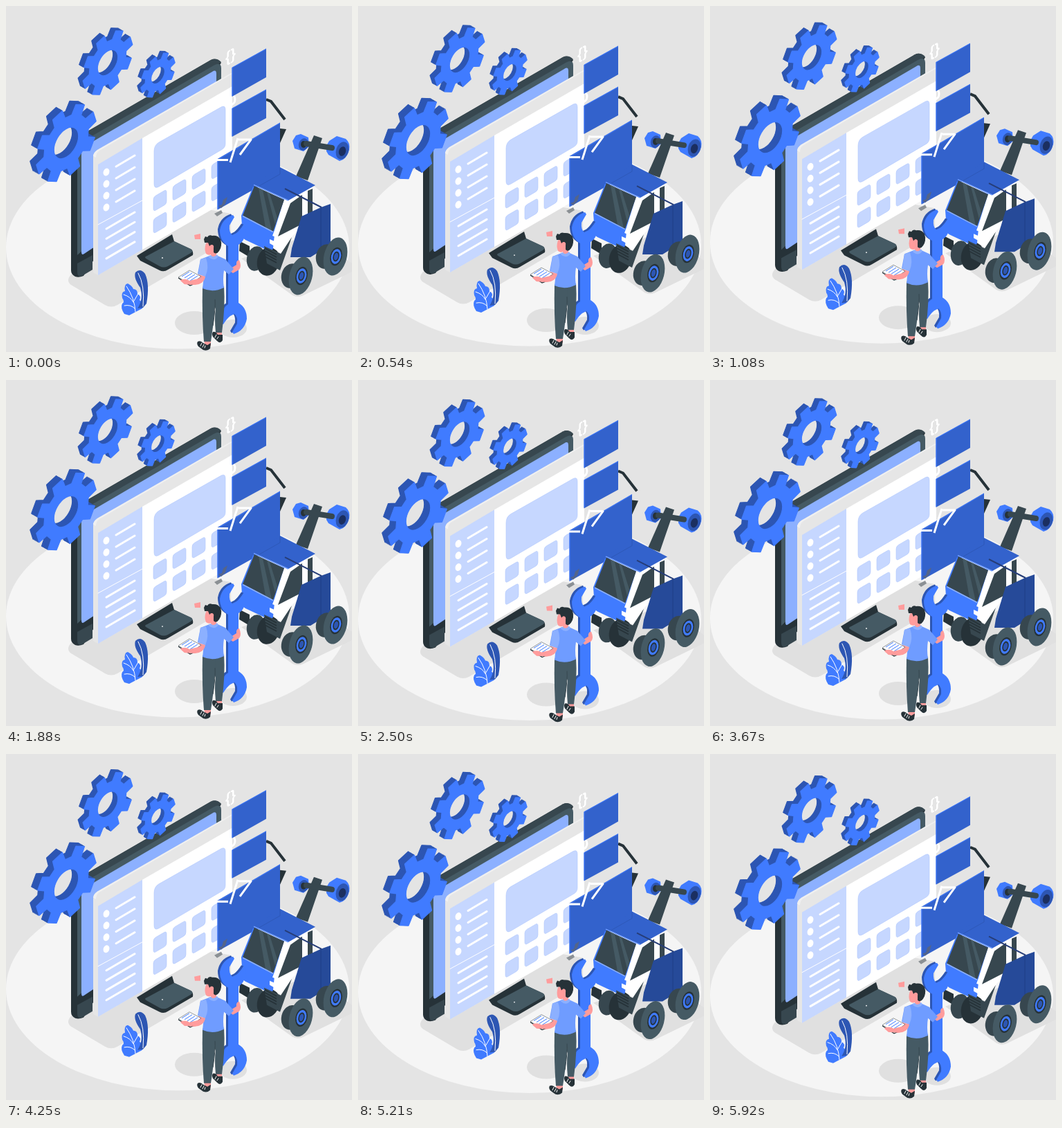
These frames come from a looping animation (500x500 px, 5.96 s). An HTML page:

```html
<!DOCTYPE html>
<html lang="en">
<head>
<meta charset="utf-8">
<title>Website maintenance</title>
<style>
html, body { margin: 0; width: 100%; height: 100%; overflow: hidden; background: #e4e4e4; }
svg { display: block; width: 100%; height: 100%; }
.blue { fill: #407bff; }
.mid { fill: #3362cc; }
.deep { fill: #2d56b3; }
.navy { fill: #264a99; }
.sky { fill: #8cb0ff; }
.pale { fill: #c6d7ff; }
.ink { fill: #263238; }
.slate { fill: #37474f; }
.steel { fill: #455a64; }
.white { fill: #fff; }
.skin { fill: #ff9c9c; }
.shade { fill: #e0e0e0; }
.line { fill: none; stroke: #fff; stroke-linecap: round; stroke-linejoin: round; }
</style>
</head>
<body>
<svg viewBox="0 0 500 500">
<g id="scene">
  <!-- ground and shadows -->
  <ellipse cx="248" cy="349" rx="248" ry="146.5" fill="#f5f5f5"/>
  <g class="shade">
    <path d="M94 388Q86 397 94 403L143 432Q152 437 161 432L325 336V300L270 290Z"/>
    <path d="M340 365L414 418Q422 422 430 418L500 384V372L440 330Z"/>
    <ellipse cx="272" cy="458" rx="28" ry="17"/>
    <ellipse cx="328" cy="466" rx="20" ry="13"/>
  </g>

  <!-- monitor -->
  <path class="ink" d="M94 232Q95 205 118 181L296 78Q304 74 311 82L112 390Q105 393 100 391Q94 388 94 382Z"/>
  <path class="slate" d="M118 181L296 78Q304 74 311 81L304 86L112 200Z"/>
  <path class="steel" d="M103 214Q103 202 112 195L300 86Q311 80 311 90V120L125 340L103 360Z"/>
  <path class="slate" d="M103 372L125 360V381L110 390Q103 393 103 384Z"/>
  <path class="sky" d="M109 214Q109 206 115 202L298 95Q304 91 304 98V240L125 350L113 358Q109 361 109 355Z"/>
  <path class="ink" d="M189 361L240 330L243 340L268 352Q271 355 270 360L234 381Q228 385 222 382L194 368Z"/>
  <path class="steel" d="M204 361L243 340L267 351Q272 354 267 357L234 376Q228 379 222 376L204 366Q198 363 204 361Z"/>
  <circle class="white" cx="226" cy="364" r=".9"/>

  <!-- browser window -->
  <path fill="#e6e6e6" d="M126 219Q126 212 132 208L327 96V277L133 389L126 385Z"/>
  <path fill="#f0f0f0" d="M126 217Q126 212 132 208L327 96V98L135 209Q130 212 130 219Z"/>
  <path class="white" d="M197 191L327 116V277L197 352Z"/>
  <path class="pale" d="M133 229L197 191V352L133 389Z"/>
  <path class="line" stroke-width="1" d="M133 316L197 281"/>
  <g id="menu"></g>
  <path class="pale" stroke="#afc6fb" stroke-width=".6" d="M214 210Q214 201 221 197L311 146Q317 143 317 150V199Q317 205 311 208L221 261Q214 265 214 257Z"/>
  <g id="tiles" class="pale" stroke="#afc6fb" stroke-width=".6"></g>

  <!-- floating panels -->
  <path d="M376 135L383 138L403 164" fill="none" stroke="#263238" stroke-width="4"/>
  <path class="ink" d="M396 177L405 178L396 198Z"/>
  <ellipse class="line" cx="324" cy="135" rx="7" ry="8" stroke-width="3"/>
  <path class="mid" d="M326.5 89L376 61.5V103L326.5 131ZM326.5 148L376 120.5V162L326.5 189ZM305.5 221L396 168.5V244L305.5 294.5Z"/>
  <path d="M327 130V89L376 62M327 188V148L376 121M306 293.5V222L396 169" fill="none" stroke="#407bff"/>
  <text class="white" transform="matrix(.87 -.5 0 1 317 83)" font-family="Arial,'Liberation Sans',sans-serif" font-weight="700" font-size="22">{}</text>
  <path class="line" stroke-width="3" style="stroke-linecap:butt" d="M305 222.5H321M324 226L335 191M336 193H354L338 215"/>
  <path fill="#8b9094" d="M301 300L311 295L313 299L305 304Z"/>
  <path fill="#54658a" d="M314 280L320 276L317 286L311 292L307 289L312 287Z"/>

  <!-- vehicle -->
  <path class="slate" d="M419 246L445 187L457 191L436 252Z"/>
  <path class="blue" d="M414 195L419 187L426 185L437 190L438 203L430 210L417 206Z"/>
  <ellipse class="deep" cx="430" cy="200" rx="7" ry="9" transform="rotate(18 430 200)"/>
  <ellipse class="ink" cx="430" cy="200" rx="4" ry="5"/>
  <path class="blue" d="M463 202L467 195L478 188L491 192Q498 198 496 208Q492 222 482 224L466 215L463 210Z"/>
  <path d="M434 199L471 205" stroke="#37474f" stroke-width="8" stroke-linecap="round"/>
  <ellipse class="deep" cx="486" cy="209" rx="9" ry="13" transform="rotate(18 486 209)"/>
  <ellipse cx="486" cy="210" rx="5" ry="7" fill="#1b2f60" transform="rotate(18 486 210)"/>

  <path class="ink" d="M338 340L352 347L352 363L337 354Z"/>
  <ellipse class="slate" cx="361" cy="365" rx="13" ry="18" transform="rotate(12 361 365)"/>
  <ellipse class="ink" cx="379" cy="369" rx="16" ry="21" transform="rotate(14 379 369)"/>
  <path class="white" d="M406 278L442 260V308L414 332L398 358L386 350L388 328Z"/>
  <path class="slate" d="M411 285L428 273V315L393 333ZM436 267L443 264V315L436 312Z"/>
  <path class="blue" d="M357 261L406 281L388 330L386 350Q385 355 380 354L346 338Q342 336 342 331L340 303Z"/>
  <path class="white" d="M402 279L409 279L390 334L385 332L388 324Z"/>
  <path class="slate" d="M359 260L402 280L386 326L342 303Z"/>
  <path class="steel" d="M365 263L371 266L384 325L375 320ZM377 269L381 271L392 306L389 316Z"/>
  <path d="M342 303.5L386 326.5" stroke="#8cb0ff" stroke-width="1.5"/>
  <path class="mid" d="M358 258L396 233L447 259L408 281Z"/>
  <path d="M358 258.5L408 281" stroke="#6f9cff" stroke-width="1.5"/>
  <path d="M396 234V243L366 260" fill="none" stroke="#2d56b3" stroke-width=".8"/>
  <path class="white" d="M381 337L388 340V347L381 343Z"/>
  <path class="slate" d="M373 347L397 358L413 334L396 382L377 372Z"/>
  <path d="M374 350l17 9m-17-5l17 9m-17-5l17 9m-17-5l17 9" stroke="#263238" stroke-width="1.6"/>
  <path class="navy" d="M427 304L455 291L469 286V345L440 363L411 363L413 350Z"/>
  <path d="M455 291V352" stroke="#1d3a80" stroke-width=".8"/>
  <path d="M403 264L456 291" stroke="#263d78" stroke-width="2"/>
  <g id="wheels"></g>

  <!-- plant -->
  <path class="blue" d="M171 445Q165 436 168 430Q172 428 168 422Q166 413 172 412Q170 402 176 401Q182 404 184 409Q190 409 190 416Q196 419 193 425Q199 428 197 437L178 447Z"/>
  <path class="deep" d="M190 437Q199 424 194 407Q184 393 187 385Q194 378 201 387Q208 402 203 430L198 436Z"/>
  <path class="line" stroke-width="1" d="M174 405Q186 422 187 442M170 417Q180 420 184 428M171 433Q180 431 186 437M192 414L185 426M191 386Q201 404 198 434"/>

  <!-- wrench -->
  <g id="wrench"></g>

  <!-- person -->
  <path class="skin" d="M272 331L281 329V337L273 337Z"/>
  <path class="skin" d="M286 480H296V491L287 489ZM303 468H312V478L304 478Z"/>
  <path class="ink" d="M277 485Q281 483 285 487L291 490L296 487L295 495Q291 499 285 497L278 492Q275 488 277 485ZM299 471Q303 470 306 475L313 475V483Q310 489 305 484L299 478Q297 474 299 471Z"/>
  <path class="line" stroke-width="1" d="M281 491l2-4m1 6l2-4m1 5l1-3M302 479l2-4m1 6l2-3"/>
  <path class="steel" d="M298 408L315 405Q317 435 312 472H303Q301 450 303 438L298 425Z"/>
  <path class="steel" d="M284 406L303 409Q303 440 296 485H286Q283 450 284 406Z"/>
  <path d="M302 424Q303 436 299 462" fill="none" stroke="#37474f"/>
  <path class="skin" d="M322 382L328 386L337 381Q341 376 337 367Q332 368 333 374L325 379Z"/>
  <path fill="#6f9cff" d="M281 366L294 361H306L317 366L329 380L322 388L315 382Q313 395 315 407Q299 415 284 408L286 390L277 387Z"/>
  <path fill="#8cb0ff" d="M281 366L289 364Q294 378 288 391L278 388Z"/>
  <path class="skin" d="M278 388L288 391Q286 402 273 403L258 402L252 397L258 395L272 396Z"/>
  <path class="skin" d="M289 343Q286 351 289 358Q293 361 296 359V363Q301 366 304 361V345L296 338Z"/>
  <path class="sky" d="M293 361L296 360Q300 365 305 359L307 362Q301 370 293 363Z"/>
  <path class="ink" d="M287 342L286 337L288 333L291 334Q293 330 298 332Q306 331 310 337Q313 347 308 354Q304 360 300 356V350Q301 345 297 345L294 347L292 342Z"/>
  <ellipse class="skin" cx="297" cy="349" rx="2.5" ry="4"/>
  <path class="white" stroke="#263238" stroke-width=".5" d="M249 392L265 382L282 391L266 402Z"/>
  <path d="M249 393L266 404L271 402" fill="none" stroke="#263238" stroke-width="1.2"/>
  <path d="M254 391l11-7m-7 9l11-7m-7 9l11-7m-7 9l11-7" stroke="#407bff" stroke-width="1"/>
  <path class="skin" d="M252 396Q260 393 265 397L282 393L284 399L272 403L258 402Z"/>

  <g id="gears"></g>
</g>
</svg>
<script>
const el = id => document.getElementById(id);
const range = n => [...Array(n).keys()];

// Sidebar entries
el('menu').innerHTML = range(4).map(i => `
  <ellipse class="white" cx="145" cy="${240 + 17 * i}" rx="4.3" ry="5.6" transform="rotate(20 145 ${240 + 17 * i})"/>
  <path class="line" stroke-width="3" d="M159 ${232 + 17 * i}l27-16M145 ${322 + 14.3 * i}l41-24"/>`).join('');

// Tiles of the content grid; the last column runs behind the large panel
const tile = 'M-9.5-1Q-9.5-5-6-7L6-14Q9.5-16 9.5-12V1Q9.5 5 6 7L-6 14Q-9.5 16-9.5 12Z';
el('tiles').innerHTML = range(8).filter(i => i % 4 < 3).map(i => {
  const col = i % 4, row = i >> 2;
  return `<path d="${tile}" transform="translate(${222.5 + 28 * col} ${281 - 15.4 * col + 32 * row})"/>`;
}).join('') + range(2).map(row =>
  `<path d="${tile}" transform="translate(306.5 ${234.8 + 32 * row})"/>`).join('');

// Wheels: tyre depth, face and hub
const oval = (x, y, rx, ry, cls) =>
  `<ellipse class="${cls}" cx="${x}" cy="${y}" rx="${rx}" ry="${ry}" transform="rotate(14 ${x} ${y})"/>`;
const wheel = (x, y) => oval(x - 14, y, 14, 18, 'slate') + oval(x, y, 16.5, 28, 'steel') +
  oval(x + 1, y, 8.5, 13.5, 'ink') + oval(x + 1, y, 7, 11, 'blue') + oval(x + 1, y, 4.5, 7.5, 'ink') +
  oval(x + 1, y, 3, 5.5, 'deep');
el('wheels').innerHTML = wheel(476, 362) + wheel(426, 390);

// Wrench: one end turned by half a circle gives the other; dark edge under a bright face
const end = `M321 389V347Q309 340 309 324Q312 307 328 302L330 305L323 317Q322 327 327 331
  L333 328Q338 324 343 316L346 317Q348 338 336 345V389Z`;
const wrench = (cls, dx, dy) => `<g class="${cls}" transform="translate(${dx} ${dy})">
  <path d="${end}"/><path d="${end}" transform="rotate(180 328.5 388)"/></g>`;
el('wrench').innerHTML = wrench('deep', -3, -1.5) + wrench('blue', 0, 0);

// Gears: extruded from the back to the front face in the isometric plane
function gear(x, y, r, hole, depth) {
  const pts = range(8).flatMap(i =>
    [[-14, .74], [-9.5, 1], [9.5, 1], [14, .74]].map(([a, k]) => {
      const t = (28 + 45 * i + a) * Math.PI / 180;
      return `${(k * r * Math.cos(t)).toFixed(2)} ${(k * r * Math.sin(t)).toFixed(2)}`;
    }));
  const d = `M${pts.join('L')}ZM${hole} 0A${hole} ${hole} 0 1 0 ${-hole} 0A${hole} ${hole} 0 1 0 ${hole} 0Z`;
  const layer = (k, cls, color) => `<path class="${cls}" d="${d}" fill-rule="evenodd"
    stroke="${color}" stroke-width="1.5" stroke-linejoin="round"
    transform="matrix(.87 -.5 0 1 ${x - k} ${y - k * .57})"/>`;
  return range(depth).map(k => layer(depth - k, 'deep', '#2d56b3')).join('') + layer(0, 'blue', '#407bff');
}
el('gears').innerHTML = gear(87, 198, 50, 20.5, 9) + gear(147, 82, 41.5, 17, 7) + gear(219.5, 100, 28.5, 11.5, 5);

// The whole scene floats up and down at a constant speed
const period = 2980, lift = 10.8;
function draw(now) {
  const phase = now % period / period;
  const y = -lift * (1 - Math.abs(1 - 2 * phase));
  el('scene').setAttribute('transform', `translate(0 ${y.toFixed(3)})`);
  requestAnimationFrame(draw);
}
requestAnimationFrame(draw);
</script>
</body>
</html>
```
